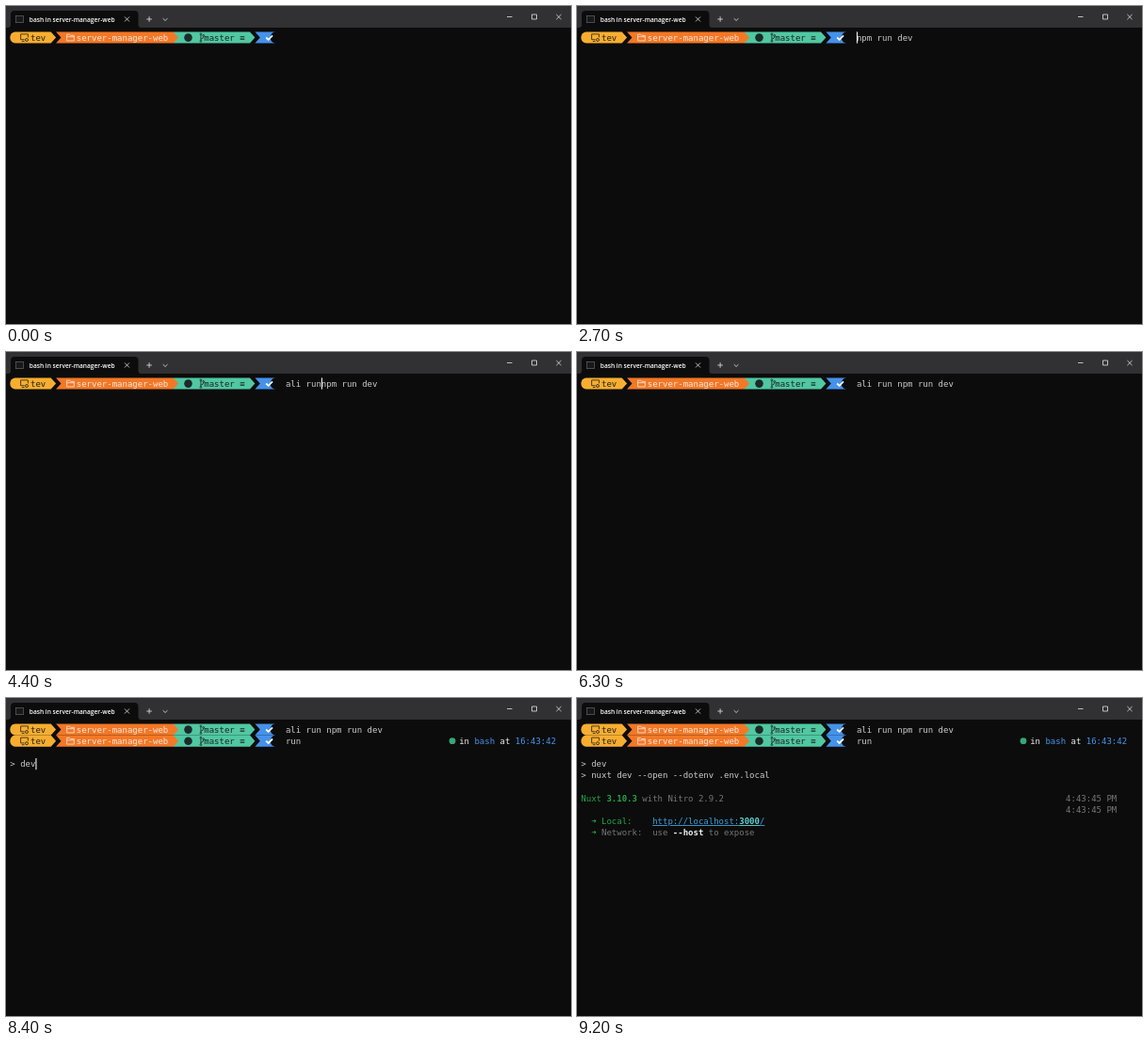
An HTML page that plays this animation: 600x338 px, repeating every 9.8 s.

```html
<!DOCTYPE html>
<html lang="en">
<head>
<meta charset="utf-8">
<title>Terminal session</title>
<style>
  html, body { margin: 0; height: 100%; overflow: hidden; background: #0c0c0c; }
  svg { display: block; width: 600px; height: 338px; }
  text { white-space: pre; font: 9px "DejaVu Sans Mono", monospace; }
  text.title { font: 600 6.6px "Open Sans", sans-serif; fill: #fff; }
  text.bold { font-weight: 700; }
  .line { fill: none; stroke-width: .8; }
</style>
</head>
<body>
<svg id="stage" viewBox="0 0 600 338" xmlns="http://www.w3.org/2000/svg">
  <rect width="600" height="338" fill="#0c0c0c"/>
  <rect width="600" height="23" fill="#313133"/>
  <path d="M2 23Q5 23 5 20V9Q5 5 9 5H136.500Q140.500 5 140.500 9V20Q140.500 23 143.500 23Z" fill="#0c0c0c"/>
  <rect x="10.300" y="10.300" width="8" height="7.400" fill="#161819" stroke="#6d7072" stroke-width=".6"/>
  <text class="title" x="24.800" y="16.500">bash in server-manager-web</text>
  <g class="line" stroke="#e4e4e4">
    <path d="M126 11.500l5 5m0-5l-5 5"/>
    <path d="M149.300 14h5.600m-2.800-2.800v5.600M166.700 13.200l2.400 2.300l2.400-2.300"/>
    <path d="M532 11.500h5.500M558.500 9h5v5h-5zM584.400 9l5.200 5.200m0-5.200l-5.200 5.200"/>
  </g>
  <g id="screen"></g>
  <rect id="cursor" width="1.100" height="12.200" fill="#f2f2f2"/>
</svg>
<script>
const LOOP = 9800, CELL = 5.419, ROW = 12.2, LEFT = 4.3, TOP = 27.4;
const INPUT = 54;
const WHITE = '#f2f2f2', TEXT = '#cccccc', GREY = '#767676', GREEN = '#20a747',
      BLUE = '#4296ec', CYAN = '#3aa0dd', DARK = '#20211f';

const screen = document.getElementById('screen');
const cursor = document.getElementById('cursor');
const colX = col => LEFT + col * CELL;
const rowY = row => TOP + row * ROW;
const timed = [];

function add(parent, tag, attrs, content = '') {
  const el = document.createElementNS('http://www.w3.org/2000/svg', tag);
  for (const name in attrs) el.setAttribute(name, attrs[name]);
  el.textContent = content;
  return parent.appendChild(el);
}

function group(from) {
  const el = add(screen, 'g', {});
  timed.push({ el, from });
  return el;
}

function write(parent, row, col, content, fill, extra = {}) {
  return add(parent, 'text', { x: colX(col), y: rowY(row) + 9.1, fill, ...extra }, content);
}

function prompt(row, from) {
  const g = group(from);
  const shapes = add(g, 'g', { transform: `translate(0 ${rowY(row)})` });
  const mid = ROW / 2;
  const fill = (d, color) => add(shapes, 'path', { d, fill: color });
  const line = (d, color, width = 0.8) =>
    add(shapes, 'path', { d, class: 'line', stroke: color, style: `stroke-width:${width}` });
  const notch = col => `M${colX(col)} 0L${colX(col + 1)} ${mid}L${colX(col)} ${ROW}`;
  const point = col => `L${colX(col)} ${ROW}L${colX(col + 1)} ${mid}L${colX(col)} 0Z`;
  const arc = (x, y) => `A${CELL} ${mid} 0 0 1 ${x} ${y}`;

  fill(`M${colX(32)} 0V${ROW}${point(47)}`, '#50c8a2');
  fill(notch(9) + point(32), '#f37826');
  fill(`M${colX(1)} ${ROW}${arc(colX(1), 0)}H${colX(8)}L${colX(9)} ${mid}L${colX(8)} ${ROW}Z`, '#f7ae30');
  fill(`${notch(48)}H${colX(52)}${arc(colX(52), 0)}Z`, '#4592eb');

  line('M19.500 8.300H15.600V2.500H23.400V6M16.800 10.100H19.500', DARK);
  add(shapes, 'circle', { cx: 22, cy: 8.6, r: 1.5, class: 'line', stroke: DARK });
  line('M64.600 9.500V2.800H67.500L68.500 3.900H72.300V9.500ZM64.600 5.300H72.300', '#f8e7e0');
  add(shapes, 'circle', { cx: 193.5, cy: 6.2, r: 4.3, fill: '#1c2a29' });
  line('M206.900 3.300V9.300M206.900 7.800Q209.700 7.500 209.700 4.700', DARK);
  for (const [cx, cy] of [[206.9, 2.5], [206.9, 10], [209.7, 4]])
    add(shapes, 'circle', { cx, cy, r: 0.9, class: 'line', stroke: DARK });
  line('M276.200 6.100L278.600 8.400L283 3.900', '#fff', 1.8);

  write(g, row, 4, 'tev', DARK);
  write(g, row, 13, 'server-manager-web', '#f8e7e0');
  write(g, row, 38, 'master ≡', DARK);
}

prompt(0, 0);
prompt(1, 6400);

const right = group(6500);
add(right, 'circle', { cx: 474, cy: rowY(1) + 6.1, r: 3.4, fill: '#35a878' });
write(right, 1, 88, 'in', WHITE);
write(right, 1, 91, 'bash', BLUE);
write(right, 1, 96, 'at', WHITE);
write(right, 1, 99, '16:43:42', BLUE);

// [time, row, column, text, colour, attributes]
const bold = { class: 'bold' }, link = { 'text-decoration': 'underline' };
const output = [
  [8400, 3, 0, '> dev', TEXT],
  [8600, 4, 0, '> nuxt dev --open --dotenv .env.local', TEXT],
  [8700, 6, 0, 'Nuxt', GREEN],
  [8700, 6, 5, '3.10.3', GREEN, bold],
  [8700, 6, 12, 'with Nitro 2.9.2', GREY],
  [8700, 6, 95, '4:43:45 PM', GREY],
  [8800, 7, 95, '4:43:45 PM', GREY],
  [8900, 8, 2, '➜', GREEN],
  [8900, 8, 4, 'Local:', GREEN],
  [8900, 8, 14, 'http://localhost:', CYAN, link],
  [8900, 8, 31, '3000', '#61d6d6', { ...link, ...bold }],
  [8900, 8, 35, '/', CYAN, link],
  [8900, 9, 2, '➜', GREEN],
  [8900, 9, 4, 'Network:', GREY],
  [8900, 9, 14, 'use', GREY],
  [8900, 9, 18, '--host', WHITE, bold],
  [8900, 9, 25, 'to expose', GREY],
];
for (const [from, ...run] of output) write(group(from), ...run);

const typed = [
  { el: write(screen, 0, INPUT, '', TEXT), steps: [
    [0, ''], [1500, 'npm run'], [1600, 'npm run dev'], [3400, 'anpm run dev'],
    [3500, 'alnpm run dev'], [4100, 'alinpm run dev'], [4200, 'ali runpm run dev'.replace('runpm', 'runpm'.replace('ru', 'run'))],
    [4400, 'ali runnpm run dev'], [5300, 'ali run npm run dev']] },
  { el: write(screen, 1, INPUT, '', TEXT), steps: [
    [0, ''], [7000, 'r'], [7100, 'ru'], [7700, 'run']] },
];
typed[0].steps[6][1] = 'ali ru' + 'npm run dev';

// [time, row, column]; no position hides the cursor
const cursorSteps = [
  [0], [600, 0, 54], [1100], [1500, 0, 61], [1600, 0, 65], [2100], [2500, 0, 65],
  [2700, 0, 54], [3400, 0, 55], [3500, 0, 56], [4100, 0, 57], [4200, 0, 60],
  [4400, 0, 61], [5300, 0, 62], [5500], [5600, 0, 62], [5800, 1, 0], [6300],
  [6500, 1, 54], [7000, 1, 55], [7100, 1, 56], [7700, 1, 57], [8000, 2, 0],
  [8400, 3, 5], [8600, 6, 0], [8700, 7, 0], [8800, 8, 0], [8900, 11, 0], [9200],
];

const stepAt = (steps, time) => steps.findLast(step => step[0] <= time);
const show = (el, on) => { el.style.display = on ? '' : 'none'; };

function render(time) {
  for (const { el, from } of timed) show(el, time >= from);
  for (const { el, steps } of typed) {
    const value = stepAt(steps, time)[1];
    if (el.textContent !== value) el.textContent = value;
  }
  const [, row, col] = stepAt(cursorSteps, time);
  show(cursor, row !== undefined);
  if (row !== undefined) {
    cursor.setAttribute('x', colX(col));
    cursor.setAttribute('y', rowY(row));
  }
}

const start = performance.now();
function tick() {
  render((performance.now() - start) % LOOP);
  requestAnimationFrame(tick);
}
tick();
</script>
</body>
</html>
```
